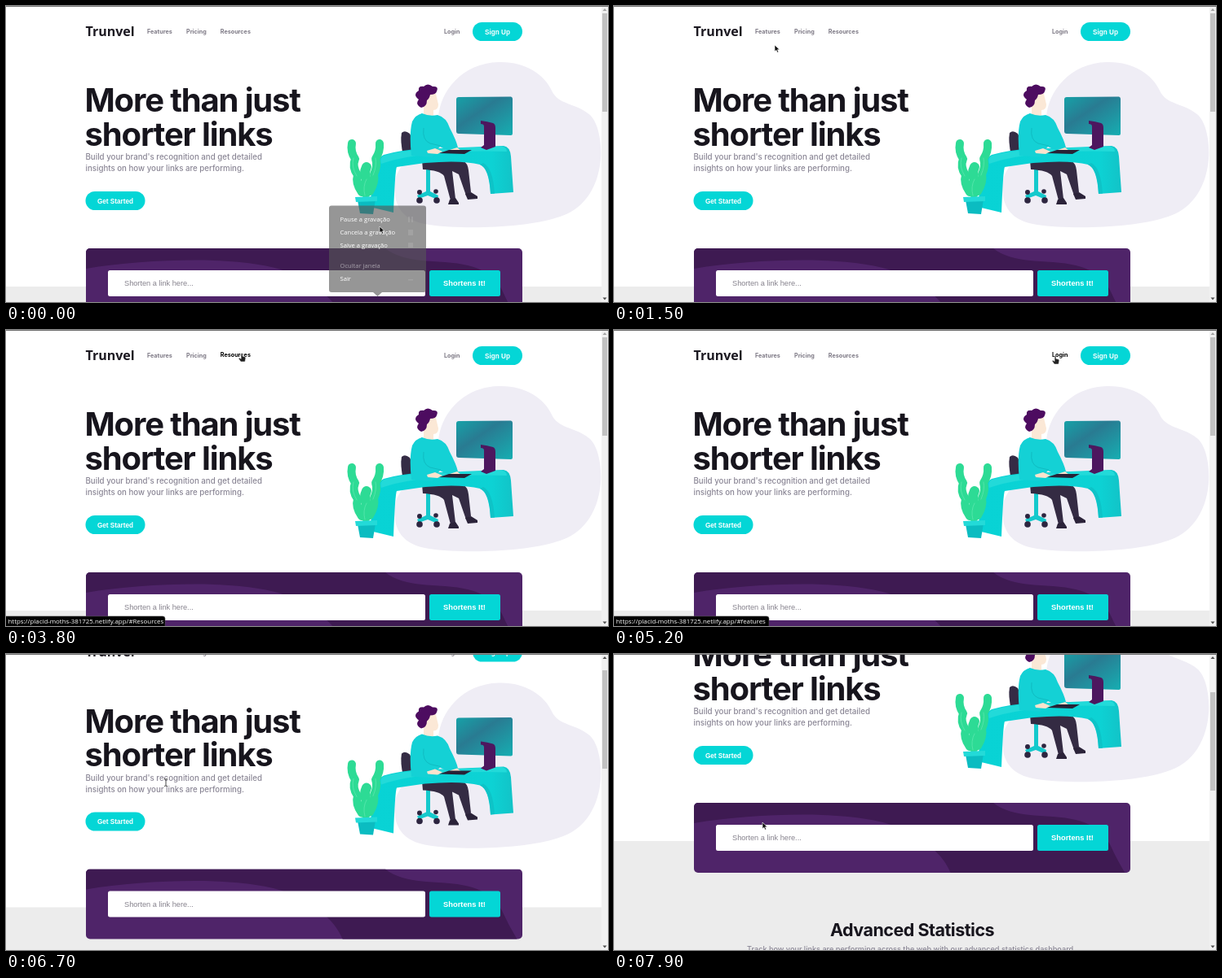
An HTML page for the animation above (8 s loop, 738 px wide and 364 px high).

```html
<!DOCTYPE html>
<html lang="en">
<head>
<meta charset="utf-8">
<title>Link shortener landing page</title>
<style>
html, body { margin: 0; width: 100%; height: 100%; overflow: hidden; background: #fff; }
svg { display: block; width: 738px; height: 364px; }
.head { font: 700 40px Inter, sans-serif; letter-spacing: -1.15px; fill: #17151d; }
.sub { font: 500 9.7px Inter, sans-serif; fill: #8a8695; }
.logo { font: 700 16px "Open Sans", sans-serif; fill: #1d1a22; }
.nav text { font: 700 7.2px Inter, sans-serif; fill: #7d7985; }
.nav text.on { fill: #000; }
.btn { font: 700 8.2px "Liberation Sans", Arial, sans-serif; fill: #fff; text-anchor: middle; }
.menu text { font: 500 7.6px "Open Sans", sans-serif; fill: #fff; }
#status text { font: 500 7.9px "Open Sans", sans-serif; fill: #fff; }
</style>
</head>
<body>
<svg viewBox="0 0 738 364">
  <defs>
    <linearGradient id="screen" x1="0" y1="0" x2="1" y2="1">
      <stop offset="0" stop-color="#16a2a8"/><stop offset="0.4" stop-color="#297b92"/><stop offset="1" stop-color="#16aeb2"/>
    </linearGradient>
    <linearGradient id="desk" x1="0" y1="0" x2="1" y2="0">
      <stop offset="0" stop-color="#08d3d5"/><stop offset="0.85" stop-color="#0dd2d4"/><stop offset="1" stop-color="#12c3c7"/>
    </linearGradient>
    <clipPath id="card"><rect x="98" y="298" width="535" height="86" rx="5"/></clipPath>
  </defs>
  <rect width="738" height="364" fill="#fff"/>

  <g id="page">
    <rect y="345" width="730" height="300" fill="#ececec"/>

    <text class="logo" x="97.5" y="36.5">Trunvel</text>
    <g class="nav">
      <text x="173" y="34">Features</text>
      <text x="221" y="34">Pricing</text>
      <text x="262.8" y="34">Resources</text>
      <text x="537" y="34">Login</text>
    </g>
    <rect x="572" y="20" width="61" height="23" rx="11.5" fill="#04d6d6"/>
    <text class="btn" x="602.5" y="34.5">Sign Up</text>

    <text class="head" x="96.5" y="130">More than just</text>
    <text class="head" x="96.5" y="171.5">shorter links</text>
    <text class="sub" x="97.5" y="189">Build your brand's recognition and get detailed</text>
    <text class="sub" x="97.5" y="203">insights on how your links are performing.</text>
    <rect x="97.5" y="228" width="73" height="23" rx="11.5" fill="#04d6d6"/>
    <text class="btn" x="134" y="242.5">Get Started</text>

    <g id="scene">
      <path fill="#efedf5" d="M604 69C636 68 660 84 669 104C677 122 699 119 716 134C729 147 730 177 729 187C727 218 712 250 676 260C637 273 560 275 519 269C490 265 476 250 476 222C477 185 530 166 530 137C532 105 559 70 604 69Z"/>
      <!-- chair -->
      <path fill="#352c45" d="M485 156Q489 152 495 157Q501 168 501 183L487 184Q483 166 485 156Z"/>
      <path fill="#14c9cc" d="M515 190H520V228L530 233L529 238L517 233L506 237L504 233L515 228Z"/>
      <g fill="#2d2540"><circle cx="507" cy="239" r="3.8"/><circle cx="528" cy="239" r="3.8"/><circle cx="507" cy="229" r="3"/><circle cx="527" cy="228" r="2.8"/></g>
      <!-- legs -->
      <path fill="#342b43" d="M510 190H560Q566 193 567 202L570 229L564 233L555 207L547 203L551 237L545 239L537 209Q532 202 511 201Z"/>
      <path fill="#2b2339" d="M544 238L551 236L555 242V244H542ZM563 231L570 229L578 234V237L566 238Z"/>
      <!-- desk -->
      <path fill="url(#desk)" d="M463 183Q484 177 507 176L610 172Q618 173 619 185L622 229L594 231Q592 199 581 195Q558 189 514 193L479 198Q477 202 475 254L446 247Q449 217 453 199Q456 186 463 183Z"/>
      <path fill="#22dad9" d="M463 184Q484 178 507 177L608 172.500Q614 174 614 179Q553 177 503 184Q477 188 460 194Q458 187 463 184Z"/>
      <path fill="#0ec3c7" d="M594 231Q593 200 581 195L585 193Q597 199 599 230.500Z"/>
      <!-- monitor -->
      <path fill="url(#screen)" d="M555 112L619 111.500Q621 112 621 114V157Q621 159 619 159L555 157Q552 157 552 154V115Q552 112 555 112Z"/>
      <path fill="#4d175f" d="M582 141Q590 142 597 144Q600 145 600 150V173L589 177L582 174L586 171V148Q586 145 582 145Z"/>
      <!-- person -->
      <path fill="#fbe8d6" d="M514 110Q520 103 527 108L530 121Q530 128 524 128L524 139H512V122Z"/>
      <path fill="#4d0c60" d="M509 125Q501 121 506 115Q498 109 506 104Q505 98 512 99Q517 94 523 99Q531 98 528 105Q527 109 520 109Q519 114 516 116Q516 124 509 125Z"/>
      <path fill="#14d1d5" d="M510 132Q519 136 529 134Q540 137 544 150Q552 165 554 174L546 180L532 173L526 179L523 186L497 184Q494 157 498 142Q502 134 510 132Z"/>
      <path fill="none" stroke="#10b5bb" stroke-width=".8" d="M512 150Q510 165 520 169L533 172"/>
      <path fill="#fbe3cd" d="M516 178L526 175L535 179L529 182L517 181ZM544 177L553 174L558 178L549 180Z"/>
      <path fill="#282236" d="M531 181L543 177L571 177L562 182Z"/>
      <!-- plant -->
      <g fill="none" stroke="#2ddb95" stroke-linecap="round" stroke-linejoin="round">
        <path stroke-width="12" d="M441 230Q438 222 442 214Q438 206 442 198"/>
        <path stroke-width="10" d="M436 229Q428 218 431 208Q424 198 428 188Q422 179 424 169"/>
        <path stroke-width="10" d="M446 228Q453 216 451 207Q456 196 453 188Q459 179 458 169"/>
        <path stroke="#62e8b2" stroke-width=".7" d="M440 233Q437 222 442 213M430 209Q423 198 426 187M450 208Q455 196 453 187"/>
      </g>
      <path fill="#0bbcc1" d="M431 239L453 238L450 256L434 255Z"/>
      <path fill="#23dad8" d="M428 235L455 234V240L429 241Z"/>
    </g>

    <g clip-path="url(#card)">
      <rect x="98" y="298" width="535" height="87" fill="#4f2469"/>
      <path fill="#3e1a52" d="M98 298H465C484 313 510 313 538 315C582 318 598 331 608 349Q616 367 627 385H413C403 361 386 348 352 330C307 307 185 309 98 323Z"/>
    </g>
    <rect x="125" y="325" width="389" height="32" rx="2.500" fill="#fff"/>
    <text x="145" y="344" font-family="Liberation Sans, Arial, sans-serif" font-size="9.200" fill="#85818c">Shorten a link here...</text>
    <rect x="519" y="325" width="87" height="32" rx="2.500" fill="#04d6d6"/>
    <text class="btn" x="562" y="344" style="font-size:9.35px">Shortens It!</text>

    <text class="head" x="365.500" y="461.500" text-anchor="middle" style="font-size:21.5px;letter-spacing:-.5px">Advanced Statistics</text>
    <text class="sub" x="364.500" y="480.500" text-anchor="middle" style="font-size:9.15px">Track how your links are performing across the web with our advanced statistics dashboard.</text>
  </g>

  <rect x="730" width="8" height="364" fill="#f1f1f1"/>
  <rect id="thumb" x="731" y="9" width="6" height="121" fill="#c1c1c1"/>
  <path id="up" d="M731.500 6L734 3L736.500 6Z"/>
  <path fill="#505050" d="M731.500 358.500H736.500L734 361.500Z"/>
  <rect width="738" height="1" fill="#737373"/>

  <g id="status">
    <path id="bar" stroke="#555" stroke-width=".6"/>
    <text x="2.500" y="361" id="url"></text>
  </g>

  <g id="menu" class="menu">
    <path fill="#565656" fill-opacity=".62" d="M399 245.500H512Q515 245.500 515 248.500V349Q515 352 512 352H461L455.500 357L450 352H399Q396 352 396 349V248.500Q396 245.500 399 245.500Z"/>
    <text x="409.500" y="265">Pause a gravação</text>
    <text x="409.500" y="281">Cancela a gravação</text>
    <text x="409.500" y="297">Salve a gravação</text>
    <text x="409.500" y="321.500" opacity=".5">Ocultar janela</text>
    <text x="409.500" y="337.500">Sair</text>
    <path fill="#fff" opacity=".12" d="M493 259H495V266H493ZM497 259H499V266H497ZM493 275H499V282H493ZM493 291H499V297H493ZM493 336H499V337.500H493Z"/>
  </g>

  <g id="cursor">
    <path fill="#111" stroke="#fff" stroke-width=".6" d="M0 0V8L1.900 6.300L3.200 9.200L4.600 8.500L3.400 5.700H6Z"/>
    <path fill="#222" stroke="#fff" stroke-width=".5" d="M-.9 -1Q0 -2 .9 -1V2.200L4 3Q5 3.400 4.800 4.800L4 9H-1.200L-3.800 5.200Q-3.600 3.800 -2.300 4.400L-.9 5.500Z"/>
    <path fill="none" stroke="#333" stroke-width=".9" d="M-2 -4.500Q0 -4.500 0 -3.500Q0 -4.500 2 -4.500M0 -3.500V3.500M-2 4.500Q0 4.500 0 3.500Q0 4.500 2 4.500"/>
  </g>
</svg>
<script>
const $ = id => document.getElementById(id);
const LOOP = 8000, STEP = 100;
const links = [...document.querySelectorAll('.nav text')];
const cursors = [...$('cursor').children];

// [ms, x, y]
const path = [
  [0, 458, 271], [200, 450, 262], [600, 370, 185], [1200, 214, 70], [1500, 197, 48],
  [1900, 190, 31], [2600, 194, 31], [2900, 230, 31], [3200, 238, 31], [3500, 280, 31],
  [3800, 289, 30], [4100, 297, 31], [4300, 330, 42], [4800, 520, 44], [5000, 541, 33],
  [5500, 541, 33], [5800, 528, 40], [6200, 330, 110], [6500, 198, 158], [6700, 196, 158],
  [6900, 170, 143], [7500, 178, 186], [7900, 182, 207]
];
const scrolls = [[0, 0], [6500, 0], [6600, 6], [6700, 33.5], [6800, 79], [6900, 112], [7000, 115]];

// [from, to, link index, hash, bar width]
const hovers = [
  [1900, 2800, 0, 'features', 190], [2800, 3300, 1, 'Pricing', 187],
  [3300, 4200, 2, 'Resources', 195], [4900, 5700, 3, 'features', 190]
];

function at(keys, t) {
  const i = keys.findIndex(k => k[0] > t);
  if (i < 0) return keys[keys.length - 1].slice(1);
  const a = keys[i - 1], b = keys[i], f = (t - a[0]) / (b[0] - a[0]);
  return a.slice(1).map((v, n) => v + (b[n + 1] - v) * f);
}

function draw(t) {
  const [scroll] = at(scrolls, t), [x, y] = at(path, t);
  $('page').setAttribute('transform', `translate(0 ${-scroll})`);
  $('thumb').setAttribute('y', 9 + scroll * 0.33);
  $('up').setAttribute('fill', scroll ? '#505050' : '#a3a3a3');
  $('menu').setAttribute('opacity', Math.max(0, 1 - t / 200));

  const hover = hovers.find(h => t >= h[0] && t < h[1]);
  links.forEach((link, i) => {
    const on = !!hover && hover[2] === i;
    link.setAttribute('class', on ? 'on' : '');
    link.setAttribute('y', on ? 32.8 : 34);
  });
  $('status').setAttribute('visibility', hover ? 'visible' : 'hidden');
  if (hover) {
    $('url').textContent = 'https://placid-moths-381725.netlify.app/#' + hover[3];
    $('bar').setAttribute('d', `M-1 352H${hover[4] - 3}q3 0 3 3V365H-1Z`);
  }

  const kind = hover ? 1 : t >= 6400 && t < 6900 ? 2 : 0;
  cursors.forEach((c, i) => c.setAttribute('visibility', i === kind ? 'visible' : 'hidden'));
  $('cursor').setAttribute('transform', `translate(${x} ${y})`);
}

const start = performance.now();
function tick() {
  const t = (performance.now() - start) % LOOP;
  draw(Math.floor(t / STEP) * STEP);
  requestAnimationFrame(tick);
}
draw(0);
requestAnimationFrame(tick);
</script>
</body>
</html>
```
